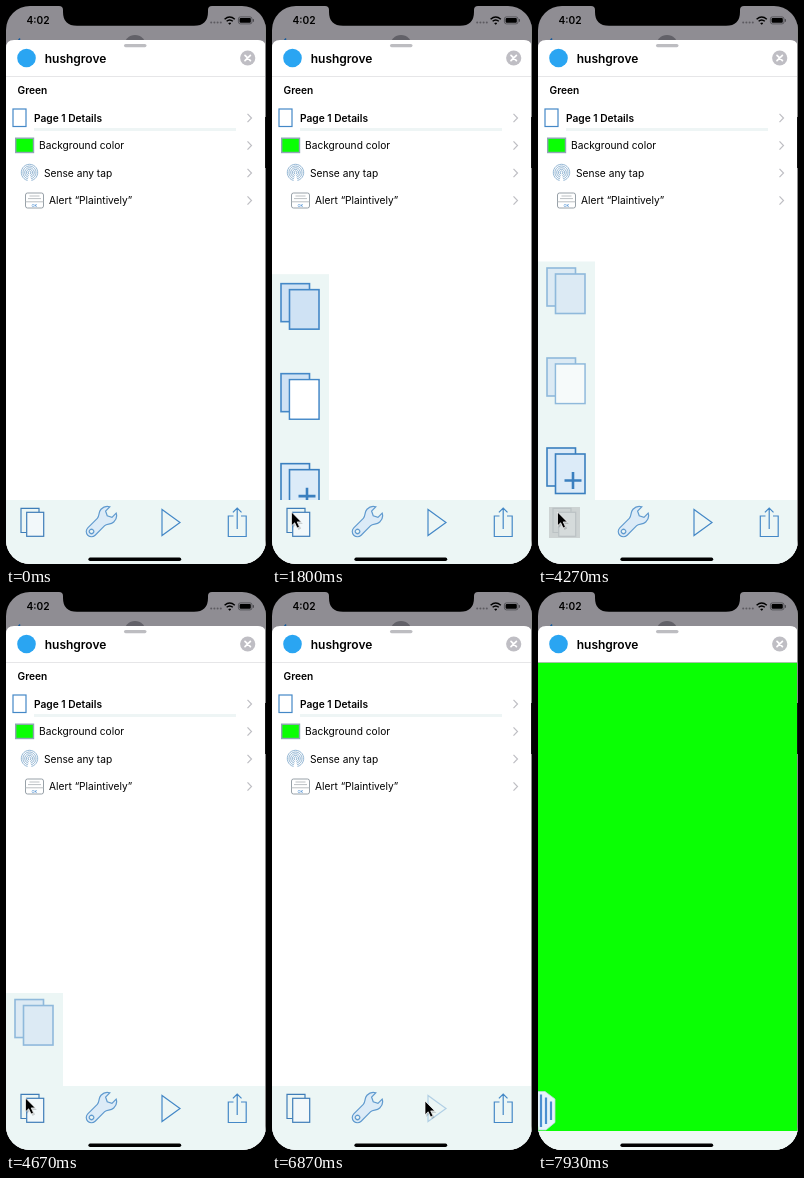
Write an HTML page that moves like this. It is 260x558 px and loops after 8 s.

```html
<!DOCTYPE html>
<html lang="en">
<head>
<meta charset="utf-8">
<title>Page editor</title>
<style>
html, body { margin: 0; width: 100%; height: 100%; overflow: hidden; background: #000; }
svg { display: block; width: 260px; height: 558px; }
text { font-family: Inter, Roboto, sans-serif; font-size: 10.2px; fill: #000; }
.b { font-weight: 600; }
.line { fill: none; stroke: #4488c7; stroke-width: 1.2; }
.chev { fill: none; stroke: #bfbfc4; stroke-width: 1.2; }
.bar { fill: #ecf6f5; }
</style>
</head>
<body>
<svg viewBox="0 0 260 558">
  <defs>
    <clipPath id="screen"><rect width="260" height="558" rx="24"/></clipPath>
    <clipPath id="above"><rect y="240" width="260" height="254"/></clipPath>
    <path id="play" class="line" d="M156 503.5V529.5L174 516.5Z"/>
    <path id="share" class="line" d="M227.5 510H222.3V530.5H240.2V510H235M231.2 523V502M226.9 506.3L231.2 502L235.5 506.3"/>
    <path id="chev" class="chev" d="M241.5 -4.2L245.5 0L241.5 4.2"/>
    <g id="sheets" stroke-width="1.6">
      <rect x="9" y="262" width="28.5" height="38"/>
      <rect x="17.5" y="268" width="29.5" height="39.5"/>
    </g>
  </defs>
  <g clip-path="url(#screen)">
    <rect width="260" height="558" fill="#8f8d93"/>
    <path d="M14 32.5L12.5 34.5" stroke="#175c9e" stroke-width="1.6"/>
    <circle cx="129" cy="40" r="11" fill="#626168"/>
    <path d="M53 0Q57 0 57 4V6Q57 19.8 71 19.8H188Q202 19.8 202 6V4Q202 0 206 0Z"/>
    <text class="b" x="20.4" y="18.4">4:02</text>
    <g fill="#5c5a60">
      <circle cx="205.2" cy="16.5" r="1"/><circle cx="208.4" cy="16.5" r="1"/>
      <circle cx="211.6" cy="16.5" r="1"/><circle cx="214.8" cy="16.5" r="1"/>
    </g>
    <g fill="none" stroke="#000" stroke-width="1.5">
      <path d="M218.6 13.2Q223.7 8.8 228.8 13.2M220.6 15.3Q223.7 12.7 226.8 15.3"/>
      <path d="M222.7 17L223.7 17.8L224.7 17"/>
    </g>
    <rect x="232.4" y="10.9" width="13.6" height="7" rx="2" fill="none" stroke="#4a494e" stroke-width=".8"/>
    <rect x="233.6" y="12.1" width="11.2" height="4.6" rx="1"/>
    <rect x="246.8" y="13" width="1.2" height="2.8" rx=".6" fill="#4a494e"/>

    <path d="M0 558V42Q0 34 8 34H252Q260 34 260 42V558Z" fill="#fff"/>
    <rect x="118" y="38" width="22.5" height="3.2" rx="1.6" fill="#bdbdc1"/>
    <circle cx="20.5" cy="52" r="9.3" fill="#2aa5f2"/>
    <text class="b" x="38.7" y="56.5" style="font-size:12px">hushgrove</text>
    <circle cx="241.7" cy="52" r="7.6" fill="#bfbec4"/>
    <path d="M239 49.3L244.4 54.7M244.4 49.3L239 54.7" stroke="#fff" stroke-width="1.7" stroke-linecap="round"/>
    <rect y="70" width="260" height="1" fill="#e6e6e8"/>

    <text class="b" x="11.5" y="88">Green</text>
    <rect class="line" x="7" y="103" width="13" height="17.5"/>
    <text class="b" x="28" y="115.6">Page 1 Details</text>
    <rect x="28" y="122" width="202" height="3" fill="#eef5f5"/>
    <rect x="9.7" y="132.2" width="17.8" height="14.3" fill="#0aff04" stroke="#8fa5b5" stroke-width="1.4"/>
    <text x="33" y="143">Background color</text>
    <g id="print" fill="none" stroke="#7aa5c9" stroke-width=".8"></g>
    <text x="38" y="170.6">Sense any tap</text>
    <rect x="19.5" y="187" width="18" height="15" rx="2" fill="#fff" stroke="#8d979f" stroke-width=".9"/>
    <path d="M23.5 190H33.5M22 192.6H35M19.5 195.8H37.5" stroke="#b5b9bd" stroke-width=".9"/>
    <text x="25.5" y="200.8" style="font-size:4px;fill:#2878c8">OK</text>
    <text x="43" y="198">Alert “Plaintively”</text>
    <use href="#chev" y="112"/><use href="#chev" y="139.5"/>
    <use href="#chev" y="167"/><use href="#chev" y="194.5"/>

    <g clip-path="url(#above)">
      <g id="panel">
        <rect class="bar" y="255.5" width="57" height="245"/>
        <g id="icons">
          <use class="dim" href="#sheets" fill="#cfe2f4" stroke="#4488c7"/>
          <g class="dim" fill="#cfe2f4" stroke="#4488c7">
            <use href="#sheets" y="90"/>
            <rect x="18.3" y="358.8" width="27.9" height="37.9" fill="#fff" stroke="none"/>
          </g>
          <use href="#sheets" y="180" fill="#dcebf8" stroke="#3a7fbf"/>
          <path d="M35 466V483M26.5 474.5H43.5" stroke="#3a7fbf" stroke-width="2.6"/>
        </g>
      </g>
    </g>

    <rect class="bar" y="494" width="260" height="64"/>
    <rect id="press" x="11" y="501" width="31" height="31" fill="#cdd3d3"/>
    <g id="pages" class="line" style="stroke:#3f7db8">
      <path d="M33 506V502.3H15V526.5H20.5"/>
      <rect x="20.7" y="506.3" width="17" height="24" fill="#f2f8fa"/>
    </g>
    <path class="line" transform="translate(95 516) rotate(-45)" style="fill:#dcebf7;stroke:#619bcf"
      d="M-13.5 -5.2H0C3.5 -5.2 4.5 -8.8 9 -9C13 -9.1 15.5 -7.4 17 -4.5H11L8.8 0L11 4.5H17C15.5 7.4 13 9.1 9 9C4.5 8.8 3.5 5.2 0 5.2H-13.5A5.2 5.2 0 0 1 -13.5 -5.2ZM-11.2 0A2.2 2.2 0 1 0 -15.6 0A2.2 2.2 0 1 0 -11.2 0Z"/>
    <use id="run" href="#play"/>
    <use href="#share"/>

    <g id="game">
      <rect y="70.5" width="260" height="468.5" fill="#0aff04"/>
      <rect y="70" width="260" height="1" fill="#a8c4a8"/>
      <rect y="539" width="260" height="19" fill="#eff8f6"/>
      <g id="tools">
        <rect class="bar" y="499" width="260" height="40.5"/>
        <path d="M0 499H259.7V539" fill="none" stroke="#a9cdb4" stroke-width=".9"/>
        <path d="M13 510L27 528M27 510L13 528" stroke="#0f78e6" stroke-width="2.6"/>
        <use href="#play" x="-103" y="2"/>
        <use href="#share" x="-131" y="2"/>
      </g>
      <g id="handle">
        <path d="M-1 499.5H7L17 507V530.5L8 538H-1Z" fill="#e6f3fa" stroke="#b7dcd6" stroke-width=".8"/>
        <path d="M3 502.5V535M8 505.5V532M13 509.5V528" stroke="#4a8fd0" stroke-width="2.2"/>
      </g>
    </g>

    <rect x="82.4" y="551.6" width="92.8" height="3.3" rx="1.65"/>
    <rect x="259" width="1" height="558" fill="#8a8a8a"/>
    <rect x="259" y="111" width="1" height="51" fill="#111"/>
    <g id="cursor">
      <path d="M1.2 1.5V16L4.6 12.8L7 18L9.7 16.6L7.3 12H11.4Z" opacity=".16"/>
      <path d="M0 0V13.8L3.2 10.8L5.6 16L8 14.9L5.7 9.9H9.8Z" stroke="#fff" stroke-width=".7"/>
    </g>
  </g>
</svg>
<script>
const LOOP = 8000, FPS = 15;
const $ = id => document.getElementById(id);
const lerp = (a, b, p) => a + (b - a) * p;
const span = (k, a, b) => Math.min(1, Math.max(0, (k - a) / (b - a)));
const smooth = p => p * p * (3 - 2 * p);
const out = p => 1 - (1 - p) ** 3;
const show = (id, on) => { $(id).style.display = on ? "" : "none"; };
const shift = (id, x, y) => $(id).setAttribute("transform", `translate(${x.toFixed(2)} ${y.toFixed(2)})`);

// fingerprint ridges
let ridges = "";
for (let r = 1.4; r < 9; r += 1.7) {
  const y = 166.5 + r * 0.97, w = r * 0.24;
  ridges += `<path d="M${23.5 - w} ${y}A${r} ${r} 0 1 1 ${23.5 + w} ${y}"/>`;
}
$("print").innerHTML = ridges;

// start step, end step, x, y, upward arc
const moves = [[0, 10, 16, 507, 0], [13, 14, 19.5, 506, 0], [77, 86, 140, 507, 4], [87, 94, 153, 509, 0]];

function cursorAt(k) {
  let x = -14, y = 477;
  for (const [a, b, tx, ty, arc] of moves) {
    const p = smooth(span(k, a, b));
    x = lerp(x, tx, p);
    y = lerp(y, ty, p) - arc * Math.sin(Math.PI * p);
  }
  return [x, y];
}

function draw(ms) {
  const k = Math.floor((ms + 4) * FPS / 1000);
  shift("cursor", ...cursorAt(k));
  show("cursor", k > 0 && k < 117);

  const open = out(span(k, 22, 30)) - smooth(span(k, 66, 73));
  shift("panel", 0, 240 * (1 - open));
  show("panel", open > 0);
  const settle = out(span(k, 30, 35));
  shift("icons", 0, 3 * (1 - settle));
  document.querySelectorAll(".dim").forEach(e => { e.style.opacity = lerp(1, 0.55, settle); });

  const held = k >= 64 && k < 67;
  show("press", held);
  $("pages").style.opacity = held ? 0.22 : k >= 18 && k < 23 ? lerp(1, 0.35, span(k, 17, 20)) : 1;
  $("pages").style.stroke = held ? "#7d8791" : "#3f7db8";
  $("run").style.opacity = k >= 103 ? 0.35 : 1;

  show("game", k >= 106);
  shift("tools", -262 * smooth(span(k, 105.75, 113.75)), 0);
  shift("handle", -18 * (1 - span(k, 116, 119)), 0);
}

function tick(now) {
  draw(now % LOOP);
  requestAnimationFrame(tick);
}
draw(0);
requestAnimationFrame(tick);
</script>
</body>
</html>
```
